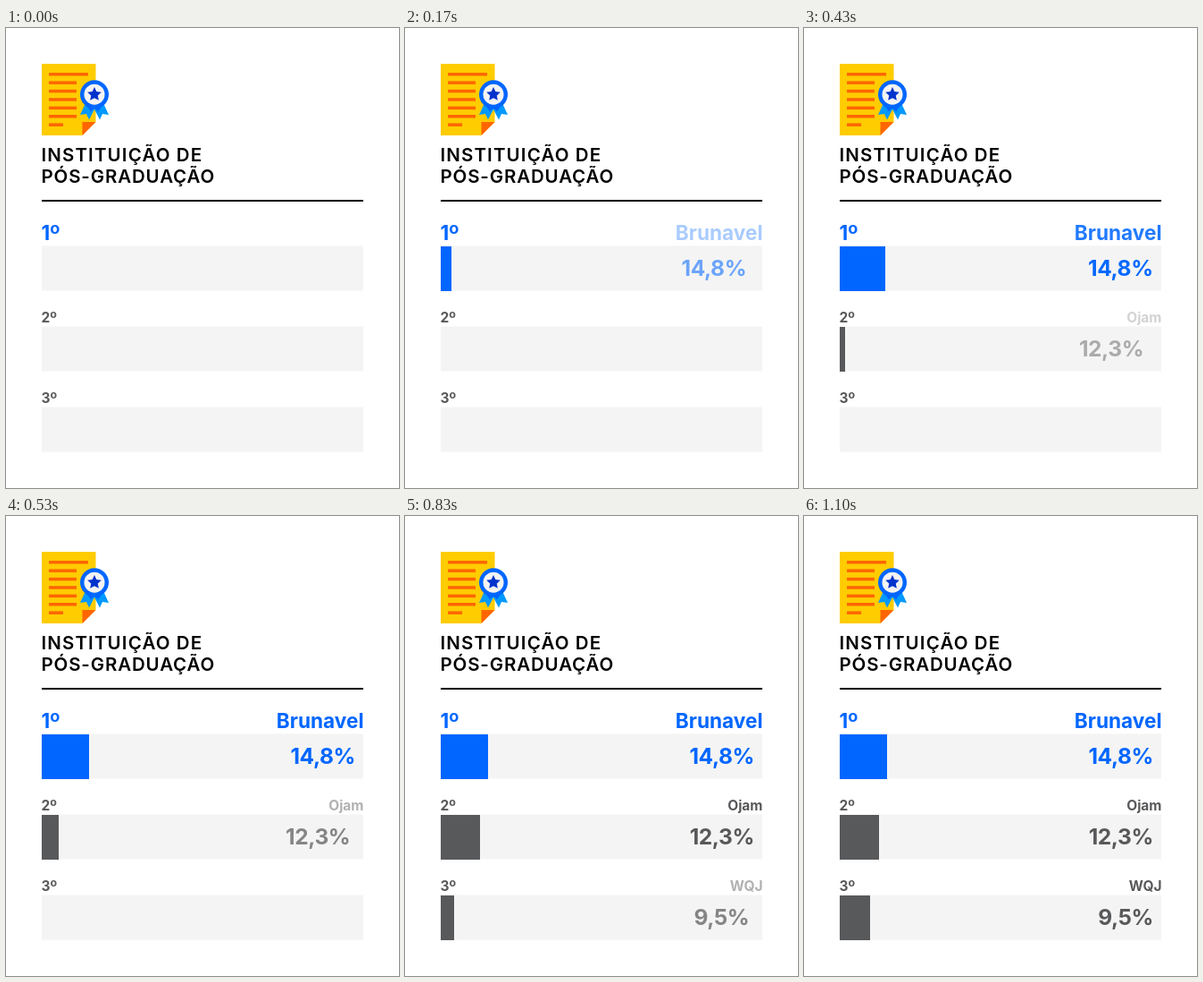
An HTML page for the animation above (1.13 s loop, 440x514 px).

```html
<!DOCTYPE html>
<html lang="pt-BR">
<head>
<meta charset="utf-8">
<title>Instituição de pós-graduação</title>
<style>
  html, body { margin: 0; width: 100%; height: 100%; overflow: hidden; background: #fff; }
  svg { display: block; width: 440px; height: 514px; }
  text { font-family: Inter, "Open Sans", sans-serif; font-weight: 700; }
  .title { font-size: 20.5px; font-weight: 600; }
  .end { text-anchor: end; }
  .value { font-size: 24.5px; letter-spacing: -.4px; }
</style>
</head>
<body>
<svg viewBox="0 0 440 514">
  <g id="icon">
    <path fill="#fc0" d="M40 40H100.500V105L85.500 120H40Z"/>
    <path fill="#f60" d="M85.500 105H100.500L85.500 120Z"/>
    <g id="lines" fill="#f60"></g>
    <path fill="#09f" d="M89 84L83 97L90 96L93 102.500L99 91L105 102.500L108 96L115 97L109 84Z"/>
    <path fill="#06f" d="M90 86L95 93.500L99 89.500L103 93.500L108 86Z"/>
    <circle cx="99" cy="74.200" r="16" fill="#06f"/>
    <circle cx="99" cy="74.200" r="11.500" fill="#f4f4f4"/>
    <polygon id="star" fill="#03c"/>
  </g>
  <text class="title" x="39.500" y="149" letter-spacing="1.15">INSTITUIÇÃO DE</text>
  <text class="title" x="39.500" y="173" letter-spacing=".85">PÓS-GRADUAÇÃO</text>
  <path d="M40 193H400" stroke="#000" stroke-width="2"/>
  <g id="rows"></g>
</svg>
<script>
const LOOP = 1130, RISE = 500, SLIDE = 20;
const BLUE = '#0066ff', GRAY = '#58595b';
const rows = [
  { rank: '1º', name: 'Brunavel', value: '14,8%', width: 53, top: 244, start: 0, color: BLUE, size: 22.6, base: 237 },
  { rank: '2º', name: 'Ojam', value: '12,3%', width: 44, top: 334, start: 300, color: GRAY, size: 15.5, base: 329 },
  { rank: '3º', name: 'WQJ', value: '9,5%', width: 34, top: 424, start: 600, color: GRAY, size: 15.5, base: 419 }
];

function add(parent, tag, attrs, text = '') {
  const el = document.createElementNS('http://www.w3.org/2000/svg', tag);
  for (const key in attrs) el.setAttribute(key, attrs[key]);
  el.textContent = text;
  return parent.appendChild(el);
}

const byId = id => document.getElementById(id);

[44, 31, 31, 31, 31, 31, 16].forEach((width, i) =>
  add(byId('lines'), 'rect', { x: 48, y: 50 + i * 9.4, width, height: 3.5 }));

byId('star').setAttribute('points', Array.from({ length: 10 }, (_, i) => {
  const r = i % 2 ? 4 : 8.2, a = i * Math.PI / 5;
  return [99 + r * Math.sin(a), 74.2 - r * Math.cos(a)].map(v => v.toFixed(2));
}).join(' '));

for (const row of rows) {
  const { top, base, color: fill, size } = row;
  const g = add(byId('rows'), 'g', { fill });
  add(g, 'rect', { x: 40, y: top - 0.5, width: 360, height: 50, fill: '#f4f4f4' });
  add(g, 'text', { x: 39.5, y: base, 'font-size': size }, row.rank);
  row.bar = add(g, 'rect', { x: 40, y: top, width: 0, height: 50 });
  row.label = add(g, 'text', { x: 400.5, y: base, 'font-size': size, class: 'end' }, row.name);
  row.number = add(g, 'text', { x: 391, y: top + 33, class: 'end value' }, row.value);
}

const easeInOut = u => u < 0.5 ? 2 * u * u : 1 - 2 * (1 - u) ** 2;
const easeOut = u => 1 - (1 - u) ** 2;

// Thirty pictures a second: each is shown from its start rounded to 10 ms.
function snap(t) {
  const r = t % 100;
  const third = r < 30 ? 0 : r < 70 ? 1 : 2;
  return t - r + third * 100 / 3;
}

function draw(t) {
  for (const row of rows) {
    const u = Math.min(1, Math.max(0, (t - row.start) / RISE));
    const out = easeOut(u);
    const width = row.width * easeInOut(u);
    row.bar.setAttribute('width', u > 0 ? Math.max(1, Math.round(width)) : 0);
    row.label.setAttribute('opacity', u);
    row.number.setAttribute('opacity', out);
    row.number.setAttribute('transform', `translate(${SLIDE * (out - 1)} 0)`);
  }
}

const begin = performance.now();
function tick() {
  draw(snap((performance.now() - begin) % LOOP));
  requestAnimationFrame(tick);
}
tick();
</script>
</body>
</html>
```
